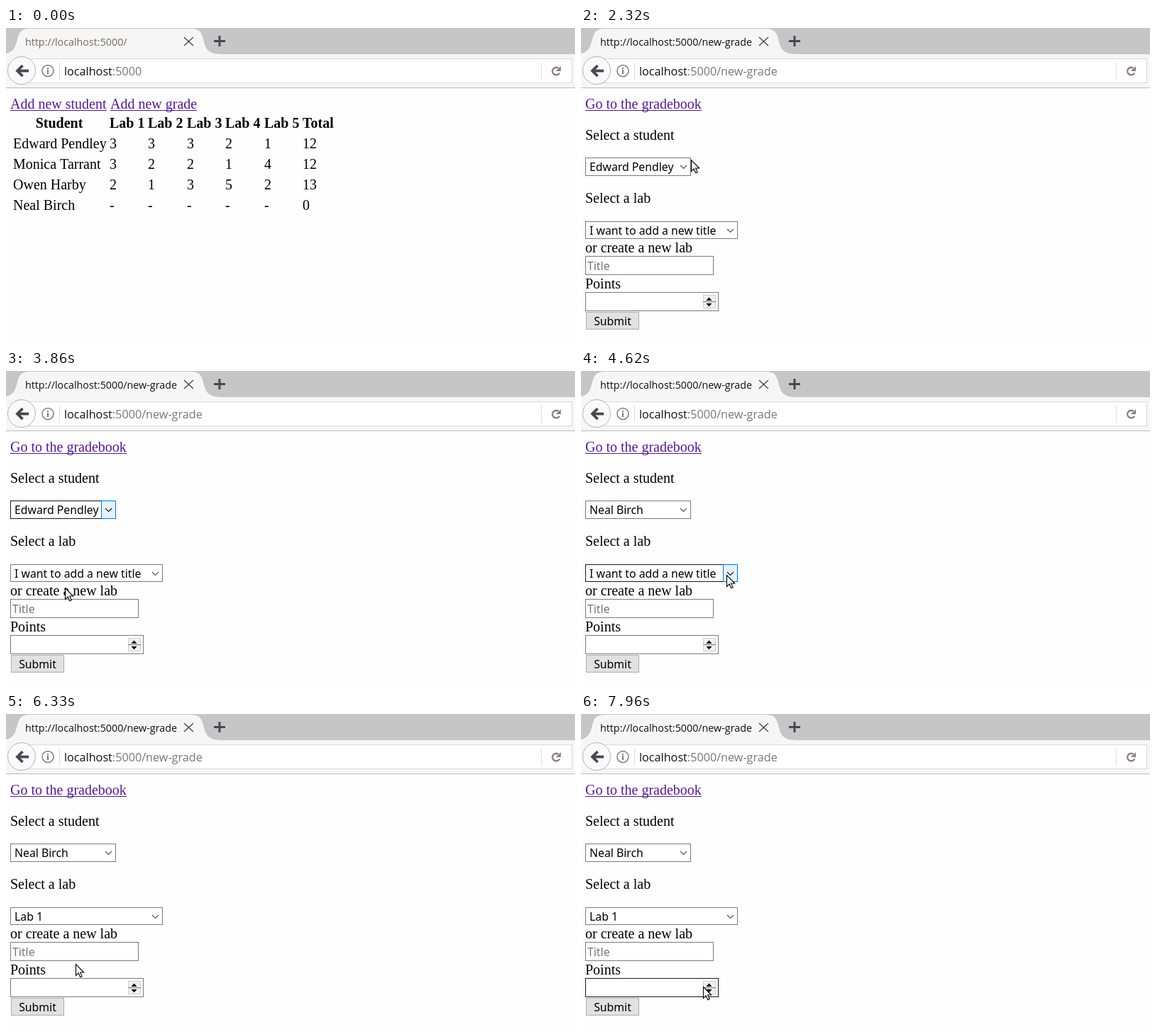
Recreate the animation shown at these times as an HTML page with a canvas. Size 802 by 445 pixels, loop 8000 ms.

```html
<!DOCTYPE html>
<html lang="en">
<head>
<meta charset="utf-8">
<title>Gradebook</title>
<style>
html, body { margin: 0; width: 100%; height: 100%; overflow: hidden; background: #fff; }
canvas { display: block; width: 802px; height: 445px; }
</style>
</head>
<body>
<canvas id="stage"></canvas>
<script>
const W = 802, H = 445, LOOP = 8000;
const canvas = document.getElementById('stage');
const dpr = window.devicePixelRatio || 1;
canvas.width = W * dpr;
canvas.height = H * dpr;
const ctx = canvas.getContext('2d');
ctx.scale(dpr, dpr);

const SERIF = '20px "Liberation Serif", serif';
const BOLD = 'bold ' + SERIF;
const FORM = '15.8px "Noto Sans", sans-serif';
const OPTION = '14px "Noto Sans", sans-serif';
const TAB = '14.3px "Open Sans", sans-serif';
const ADDRESS = '16.2px "Open Sans", sans-serif';
const PURPLE = '#551a8b', BLUE = '#0078d7', GREY = '#7a7a7a', DARK = '#171717';

const students = [
  ['Edward Pendley', '33321', 12],
  ['Monica Tarrant', '32214', 12],
  ['Owen Harby', '21352', 13],
  ['Neal Birch', '-----', 0]
];
const names = students.map(s => s[0]);
const NEW_LAB = 'I want to add a new title';
const labs = [NEW_LAB, 'Lab 1', 'Lab 2', 'Lab 3', 'Lab 4', 'Lab 5'];

const TICK = 77.3, START = 150;
const PRESS = 17, FORM_PAGE = 19;
const NAMES_OPEN = 32, NAMES_CLOSE = 48, LABS_OPEN = 62, LABS_CLOSE = 80;

// Pointer path: tick, x, y
const path = [
  [0, 644, 430], [3, 476, 282], [6, 308, 160], [9, 243, 107],
  [18, 243, 107], [19, 242, 107], [21, 242, 107], [29, 142, 197],
  [35, 142, 197], [37, 110, 254], [39, 88, 299],
  [40, 88, 299], [42, 83, 306], [48, 83, 306], [58, 205, 288],
  [59, 205, 288], [60, 204, 288], [64, 204, 288], [67, 132, 326], [70, 98, 353],
  [84, 98, 353], [85, 95, 353], [86, 95, 353], [88, 112, 340],
  [89, 112, 340], [92, 131, 366], [94, 150, 386],
  [95, 150, 386], [97, 163, 386], [98, 163, 386], [101, 172, 385]
];

function pointerAt(tick) {
  const next = path.findIndex(p => p[0] >= tick);
  if (next < 0) return path[path.length - 1].slice(1);
  if (next === 0) return path[0].slice(1);
  const [t0, x0, y0] = path[next - 1], [t1, x1, y1] = path[next];
  const k = (tick - t0) / (t1 - t0);
  return [Math.round(x0 + (x1 - x0) * k), Math.round(y0 + (y1 - y0) * k)];
}

const inside = ([x, y], [l, t, r, b]) => x >= l && x < r && y >= t && y < b;

function text(str, x, y, font, color = '#000', align = 'left') {
  ctx.font = font;
  ctx.fillStyle = color;
  ctx.textAlign = align;
  ctx.fillText(str, x, y);
  return ctx.measureText(str).width;
}

function rect(l, t, r, b, fill) {
  ctx.fillStyle = fill;
  ctx.fillRect(l, t, r - l, b - t);
}

function box([l, t, r, b], fill, border) {
  rect(l, t, r, b, border);
  rect(l + 1, t + 1, r - 1, b - 1, fill);
}

function line(points, color, width) {
  ctx.beginPath();
  points.forEach(([x, y]) => ctx.lineTo(x, y));
  ctx.strokeStyle = color;
  ctx.lineWidth = width;
  ctx.stroke();
}

function circle(x, y, r, fill, stroke, width) {
  ctx.beginPath();
  ctx.arc(x, y, r, 0, Math.PI * 2);
  ctx.fillStyle = fill;
  ctx.fill();
  ctx.strokeStyle = stroke;
  ctx.lineWidth = width;
  ctx.stroke();
}

function triangle(x, y, dy) {
  ctx.beginPath();
  ctx.moveTo(x - 4, y);
  ctx.lineTo(x + 4, y);
  ctx.lineTo(x, y + dy);
  ctx.fillStyle = '#000';
  ctx.fill();
}

function link(str, x, color) {
  const w = text(str, x, 114, SERIF, color);
  rect(x, 116, Math.round(x + w), 117, color);
}

const tabShape = new Path2D('M-10 37C13 37 13 26 17 12Q20 1 32 1H262Q274 1 277 12C281 26 281 37 304 37Z');

function drawBrowser(route, titleColor) {
  rect(0, 0, W, 37, '#c6c6c6');
  rect(0, 37, W, 84, '#f6f6f6');
  ctx.fillStyle = '#f6f6f6';
  ctx.fill(tabShape);
  text('http://localhost:5000/' + route, 27, 25, TAB, titleColor);
  line([[251, 13], [264, 25]], '#564a4c', 1.5);
  line([[264, 13], [251, 25]], '#564a4c', 1.5);
  line([[293, 18.5], [309, 18.5]], '#454857', 3);
  line([[301, 11], [301, 26]], '#454857', 3);

  box([22, 43, 798, 78], '#fff', '#dadada');
  circle(22, 60, 19.5, '#fafafa', '#b4b4b4', 1);
  line([[32, 60.5], [17, 60.5]], '#474752', 3.8);
  line([[23.5, 53], [16, 60.5], [23.5, 68]], '#474752', 3.8);

  circle(59, 60.5, 8, '#fff', '#857779', 1.5);
  rect(58, 59, 60, 65, '#857779');
  rect(58, 56, 60, 58, '#857779');
  rect(75, 49, 76, 73, '#dcdcdc');
  rect(754, 49, 755, 73, '#dcdcdc');

  const w = text('localhost', 82, 67, ADDRESS, '#111');
  text(':5000' + (route && '/' + route), 82 + w, 67, ADDRESS, '#777');

  ctx.beginPath();
  ctx.arc(775.5, 61, 5.3, 0.5, 5.3);
  ctx.strokeStyle = '#8c7b7e';
  ctx.lineWidth = 2.4;
  ctx.stroke();
  ctx.beginPath();
  ctx.moveTo(782, 54);
  ctx.lineTo(782, 61);
  ctx.lineTo(775, 61);
  ctx.fillStyle = '#8c7b7e';
  ctx.fill();
  rect(0, 84, W, 85, '#bcbcbc');
}

function drawGradebook(pressed) {
  link('Add new student', 6, PURPLE);
  link('Add new grade', 147, pressed ? '#ee0000' : PURPLE);
  const col = i => Math.round(146 + i * 54.46);
  text('Student', 75, 141, BOLD, '#000', 'center');
  labs.slice(1).forEach((lab, i) => text(lab, col(i), 141, BOLD));
  text('Total', col(5), 141, BOLD);
  students.forEach(([name, marks, total], row) => {
    const y = 170 + row * 29;
    text(name, 10, y, SERIF);
    [...marks, total].forEach((mark, i) => text(mark, col(i), y, SERIF));
  });
}

const namesBox = [6, 183, 155, 209], labsBox = [6, 273, 221, 298];
const titleBox = [6, 322, 187, 349], pointsBox = [6, 373, 194, 400];

function drawSelect(area, value, hot) {
  const [, t, r, b] = area;
  box(area, '#fff', hot ? DARK : GREY);
  if (hot) box([r - 21, t, r, b], '#e5f1fb', BLUE);
  text(value, 12, t + 19, FORM);
  const x = r - 10.5, y = Math.round((t + b) / 2);
  line([[x - 4.5, y - 2], [x, y + 2.5], [x + 4.5, y - 2]], hot ? '#222' : '#555', 1.2);
}

function drawPopup(options, top, right, pointer) {
  box([5, top, right, top + 2 + options.length * 30], '#fff', '#707070');
  const row = Math.max(0, Math.floor((pointer[1] - top - 1) / 30));
  options.forEach((option, i) => {
    const y = top + 1 + i * 30;
    if (i === row) rect(6, y, right - 1, y + 30, BLUE);
    text(option, 14, y + 21, OPTION, i === row ? '#fff' : '#000');
  });
}

function drawForm(tick, pointer) {
  const namesOpen = tick >= NAMES_OPEN && tick < NAMES_CLOSE;
  const labsOpen = tick >= LABS_OPEN && tick < LABS_CLOSE;
  const over = area => !namesOpen && !labsOpen && inside(pointer, area);

  link('Go to the gradebook', 6, PURPLE);
  text('Select a student', 6, 158, SERIF);
  text('Select a lab', 6, 247, SERIF);
  text('or create a new lab', 6, 317, SERIF);
  text('Points', 6, 368, SERIF);

  drawSelect(namesBox, names[tick > NAMES_CLOSE ? 3 : 0],
    over(namesBox) || (tick >= NAMES_OPEN && tick <= NAMES_CLOSE));
  drawSelect(labsBox, labs[tick >= LABS_CLOSE ? 1 : 0], over(labsBox) || labsOpen);

  box(titleBox, '#fff', over(titleBox) ? DARK : GREY);
  text('Title', 9, 342, FORM, '#757575');
  box(pointsBox, '#fff', over(pointsBox) ? DARK : GREY);
  box([172, 377, 190, 387], '#f0f0f0', '#cfcfcf');
  box([172, 387, 190, 396], '#f0f0f0', '#cfcfcf');
  rect(172, 386, 190, 387, '#8a8a8a');
  triangle(180.5, 385, -4.5);
  triangle(180.5, 389, 4.5);

  box([7, 401, 82, 426], '#e1e1e1', '#adadad');
  text('Submit', 44.5, 420, FORM, '#000', 'center');

  if (namesOpen) drawPopup(names, 208, 154, pointer);
  if (labsOpen) drawPopup(labs, 298, 220, pointer);
}

const arrow = new Path2D('M.5 .5V16.5L4.2 13L6.7 18.7L9.2 17.6L6.7 12H11.7Z');
const hand = new Path2D('M-2 2Q-2 0 0 0Q2 0 2 2V8.5Q4.5 7.5 5.5 9.5Q7.5 8.7 8.3 10.7Q10.5 10 10.5 13V16Q10.5 20 8 23.5H-.5Q-2 20 -5.5 15.5Q-6.3 12 -3.5 13L-2 14.8Z');

function drawPointer(kind, [x, y]) {
  ctx.save();
  ctx.translate(x, y);
  if (kind === 'text') {
    rect(-.5, -7, .5, 7, '#000');
    rect(-3.5, -8, 3.5, -7, '#000');
    rect(-3.5, 7, 3.5, 8, '#000');
  } else {
    const shape = kind === 'hand' ? hand : arrow;
    ctx.fillStyle = '#fff';
    ctx.fill(shape);
    ctx.strokeStyle = '#000';
    ctx.lineWidth = 1.1;
    ctx.stroke(shape);
    if (kind === 'hand') [2, 5.5, 8.3].forEach((fx, i) => line([[fx, 9 + i], [fx, 13 + i * .5]], '#000', 1));
  }
  ctx.restore();
}

function pointerKind(tick, pointer) {
  if (tick < FORM_PAGE) return inside(pointer, [147, 98, 270, 118]) ? 'hand' : 'arrow';
  const field = inside(pointer, titleBox) || inside(pointer, [6, 373, 171, 400]);
  return tick > LABS_CLOSE && field ? 'text' : 'arrow';
}

function draw(time) {
  const tick = Math.floor((time - START) / TICK + 0.25);
  const pointer = pointerAt(tick);
  const onForm = tick >= FORM_PAGE;
  rect(0, 0, W, H, '#fefefe');
  drawBrowser(onForm ? 'new-grade' : '', tick >= PRESS ? '#111' : '#7b6a5c');
  if (onForm) drawForm(tick, pointer);
  else drawGradebook(tick >= PRESS);
  if (tick >= 0) drawPointer(pointerKind(tick, pointer), pointer);
}

let origin;
function loop(now) {
  if (origin === undefined) origin = now;
  draw((now - origin) % LOOP);
  requestAnimationFrame(loop);
}
draw(0);
requestAnimationFrame(loop);
</script>
</body>
</html>
```
